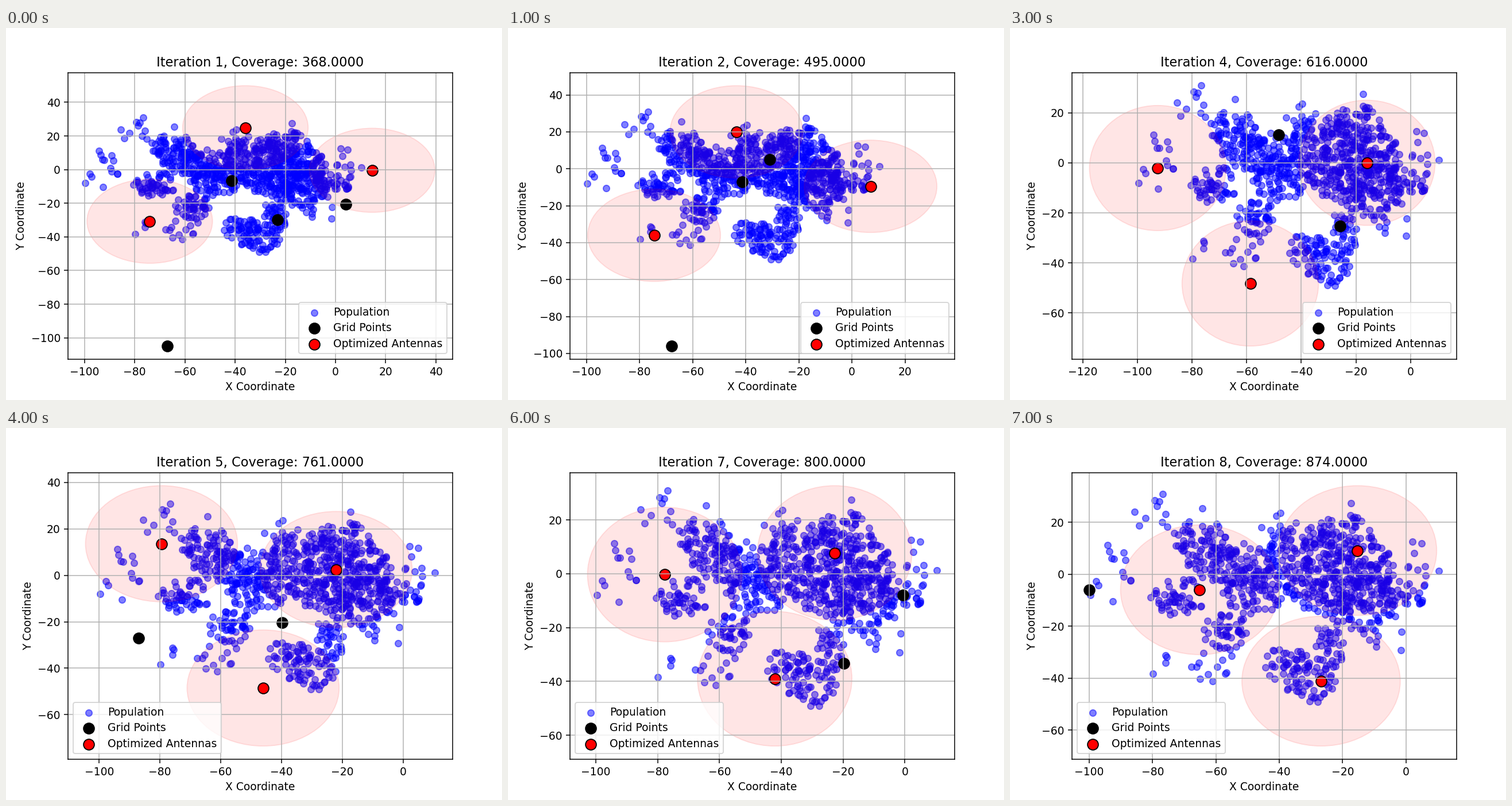
These frames come from a looping animation (864x648 px, 8000 ms). A matplotlib script:

```python
import numpy as np
import matplotlib.pyplot as plt
from matplotlib.animation import FuncAnimation
from matplotlib.patches import Circle

RADIUS = 25

# Elliptic neighbourhoods: centre x, centre y, half width, half height
TOWNS = [
    (-63, 11, 10, 10), (-55, 4, 14, 8), (-48, -6, 10, 10), (-72, -9, 9, 8),
    (-57, -22, 8, 8), (-33, 6, 12, 14), (-21, 14, 11, 10), (-22, -4, 16, 12),
    (-14, -12, 11, 11), (-11, 3, 8, 10), (-1, -7, 8, 6), (-24, -27, 5, 10),
    (-38, -35, 8, 7), (-30, -42, 8, 8),
]
OUTSKIRTS = [
    (-75, 22, 12, 8), (-92, 0, 7, 12), (-67, -35, 15, 7), (4, 7, 5, 10),
    (-42, 15, 10, 10), (-5, -22, 8, 8),
]
OUTERMOST = [(-99.6, -8), (-76.7, 30.8), (10.4, 1.2), (-17.3, 27.4)]

# Coverage, antennas, grid points
STEPS = [
    (368, [(-35.9, 24.9), (14.6, -0.4), (-74, -30.7)],
     [(-41.3, -6.5), (4.1, -20.6), (-23.1, -29.8), (-67, -104.9)]),
    (495, [(-43.5, 20), (7, -9.5), (-74.5, -36)],
     [(-41.3, -7.2), (-31, 5), (-68, -96)]),
    (612, [(-107.6, -2), (-49.9, 15.7), (-75.1, -41.6), (0.1, -18.1)],
     [(-39, 36.6), (-41.4, -8)]),
    (616, [(-92.6, -2.1), (-16, 0), (-58.7, -48.2)],
     [(-48.4, 11.1), (-25.9, -25.2)]),
    (761, [(-79.5, 13.6), (-22.1, 2.5), (-46.1, -48.5)],
     [(-87.1, -27), (-39.9, -20.3)]),
    (780, [(-77.7, 6), (-22.4, 5), (-44, -44)],
     [(-43, -14), (-30, -27)]),
    (800, [(-77.7, -0.3), (-22.7, 7.7), (-42.1, -39)],
     [(-0.5, -8), (-19.7, -33.2)]),
    (874, [(-65.1, -6), (-15.3, 9.1), (-26.8, -41.2)],
     [(-99.9, -6)]),
]


def scatter_people(rng, areas, density, falloff):
    """Random points in each ellipse, their number set by its size."""
    groups = []
    for cx, cy, w, h in areas:
        n = round(density * w * h)
        angle = rng.uniform(0, 2 * np.pi, n)
        reach = rng.random(n) ** falloff
        groups.append(np.column_stack((cx + w * reach * np.cos(angle),
                                       cy + h * reach * np.sin(angle))))
    return np.vstack(groups)


rng = np.random.default_rng(4)
population = np.vstack((OUTERMOST,
                        scatter_people(rng, TOWNS, 0.72, 0.6),
                        scatter_people(rng, OUTSKIRTS, 0.15, 0.5)))

fig, ax = plt.subplots(figsize=(6.4, 4.8), dpi=135)


def draw(i):
    coverage, antennas, points = STEPS[i]
    ax.clear()
    ax.scatter(*population.T, c="blue", alpha=0.5, label="Population")
    for spot in antennas:
        ax.add_patch(Circle(spot, RADIUS, color="red", alpha=0.1))
    ax.scatter(*zip(*points), s=100, c="black", label="Grid Points")
    ax.scatter(*zip(*antennas), s=100, c="red", edgecolors="black",
               label="Optimized Antennas")
    ax.autoscale_view()
    ax.set_title(f"Iteration {i + 1}, Coverage: {coverage:.4f}")
    ax.set_xlabel("X Coordinate")
    ax.set_ylabel("Y Coordinate")
    ax.grid(True)
    ax.legend(loc="lower right" if i < 4 else "lower left", labelspacing=0.46)


anim = FuncAnimation(fig, draw, frames=len(STEPS), init_func=lambda: None,
                     interval=1000, repeat=True, repeat_delay=0)
plt.show()
```
